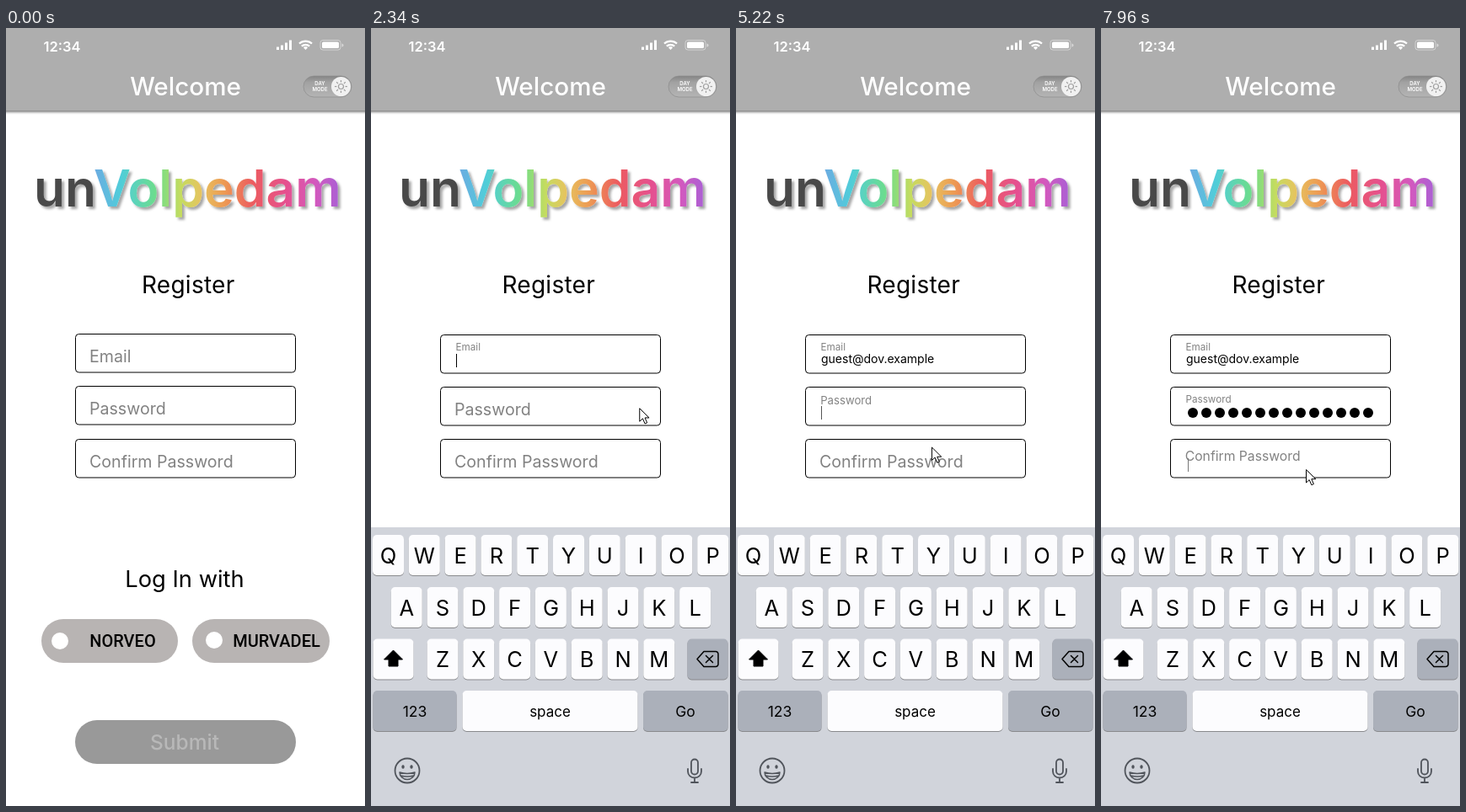
An HTML page that plays this animation: 426 px wide and 924 px high, repeating every 8000 ms.

```html
<!DOCTYPE html>
<html lang="en">
<head>
<meta charset="utf-8">
<title>Register</title>
<style>
  html, body { margin: 0; width: 100%; height: 100%; overflow: hidden; background: #fff; }
  svg { display: block; width: 100vw; height: 100vh; font-family: Inter, "Open Sans", sans-serif; }
  .mid { text-anchor: middle; }
  .provider { font: 500 20px Roboto, sans-serif; text-anchor: middle; }
</style>
</head>
<body>
<svg id="stage" viewBox="0 0 426 924">
  <defs>
    <linearGradient id="rainbow" gradientUnits="userSpaceOnUse" x1="90" y1="0" x2="397" y2="0">
      <stop offset="0" stop-color="#7a9be6"/>
      <stop offset=".15" stop-color="#50cdd9"/>
      <stop offset=".29" stop-color="#6edd8a"/>
      <stop offset=".38" stop-color="#c3dc60"/>
      <stop offset=".46" stop-color="#e6c45f"/>
      <stop offset=".55" stop-color="#ed9a53"/>
      <stop offset=".66" stop-color="#ec5c5f"/>
      <stop offset=".79" stop-color="#e5508f"/>
      <stop offset=".9" stop-color="#d459bd"/>
      <stop offset="1" stop-color="#a85fd6"/>
    </linearGradient>
    <linearGradient id="groove" x2="0" y2="1">
      <stop stop-color="#858585"/>
      <stop offset=".3" stop-color="#a2a2a2"/>
      <stop offset="1" stop-color="#b4b4b4"/>
    </linearGradient>
    <filter id="wordShadow" x="-5%" y="-10%" width="112%" height="130%">
      <feDropShadow dx="3" dy="3" stdDeviation="1.5" flood-opacity=".35"/>
    </filter>
    <filter id="barShadow" x="-5%" y="-10%" width="110%" height="130%">
      <feDropShadow dx="0" dy="2" stdDeviation="1.8" flood-opacity=".5"/>
    </filter>
    <clipPath id="typed"><rect id="typedArea" x="100" y="383" width="0" height="22"/></clipPath>
  </defs>

  <rect width="426" height="924" fill="#fff"/>

  <rect x="-10" y="-10" width="446" height="108" fill="#aeaeae" filter="url(#barShadow)"/>
  <g fill="#fff">
    <text x="44.5" y="27.5" font-size="16.5" font-weight="600">12:34</text>
    <path d="M321 22.5h3v3.500h-3zM326 20.500h3v5.500h-3zM331 17.500h3v8.500h-3zM336 14.500h3v11.500h-3z"/>
    <g fill="none" stroke="#fff" stroke-width="2.2">
      <path d="M348 18.500a11 11 0 0 1 15 0M350.800 21.600a7 7 0 0 1 9.400 0"/>
    </g>
    <path d="M355.500 26l-2.600-2.700a3.700 3.700 0 0 1 5.200 0z"/>
    <rect x="373" y="14.5" width="24" height="11.5" rx="3" fill="none" stroke="#fff" stroke-opacity=".45"/>
    <rect x="375" y="16.5" width="20" height="7.5" rx="1.5"/>
    <path d="M398.500 18.500a2 2 0 0 1 0 4z" opacity=".5"/>
    <text class="mid" x="213" y="79.5" font-size="29.6" font-weight="500">Welcome</text>
  </g>

  <rect x="353" y="57" width="57" height="25" rx="12.5" fill="url(#groove)" stroke="#8b8b8b" stroke-width=".7"/>
  <g class="mid" fill="#fff" font-size="6" font-weight="600">
    <text x="372.5" y="68">DAY</text>
    <text x="372.5" y="74.5">MODE</text>
  </g>
  <circle cx="397.5" cy="69.5" r="11.5" fill="#f1f1f1"/>
  <g id="sun" fill="none" stroke="#a0a0a0" stroke-width="1.2"><circle cx="397.5" cy="69.5" r="3"/></g>

  <text x="33" y="212" font-size="60.5" font-weight="600" filter="url(#wordShadow)"><tspan fill="#4a4a4a">un</tspan><tspan fill="url(#rainbow)">Volpedam</tspan></text>

  <text id="heading" y="315" font-size="28" letter-spacing=".25">Register</text>
  <g id="fields"></g>
  <text x="101" y="398" font-size="14" clip-path="url(#typed)">guest@dov.example</text>
  <g id="dots"></g>
  <line id="caret"/>

  <g id="submit">
    <rect x="82" y="822" width="262" height="52" rx="26" fill="#999"/>
    <text class="mid" x="212" y="857" font-size="24.5" font-weight="500" fill="#b8b8b8">Submit</text>
  </g>

  <g id="keyboard"><rect y="593" width="426" height="331" fill="#d1d4db"/></g>

  <g id="login">
    <text class="mid" x="212" y="664" font-size="27.3">Log In with</text>
    <rect x="42" y="702" width="162" height="52" rx="26" fill="#b8b4b3"/>
    <rect x="221" y="702" width="163" height="52" rx="26" fill="#b8b4b3"/>
    <circle cx="64" cy="728" r="10" fill="#fff"/>
    <circle cx="247" cy="727" r="10" fill="#fff"/>
    <text class="provider" x="138.5" y="735">NORVEO</text>
    <text class="provider" x="321" y="735">MURVADEL</text>
  </g>

  <path id="pointer" d="M.5.500V16l3.700-3.400 2.600 6.100 2.600-1.100-2.600-5.900h5z" fill="#fff" stroke="#000"/>
</svg>
<script>
const LOOP = 8000;
const $ = id => document.getElementById(id);

function add(parent, tag, attrs, text) {
  const node = document.createElementNS('http://www.w3.org/2000/svg', tag);
  set(node, attrs);
  if (text) node.textContent = text;
  return parent.appendChild(node);
}
function set(node, attrs) {
  for (const name in attrs) node.setAttribute(name, attrs[name]);
}
const mix = (a, b, p) => a + (b - a) * p;
const progress = (t, start, span) => Math.max(0, Math.min(1, (t - start) / span));
const easeOut = p => 1 - (1 - p) ** 2;

for (let i = 0; i < 8; i++) {
  add($('sun'), 'path', { d: 'M397.5 64.5v-2.5', transform: `rotate(${i * 45} 397.5 69.5)` });
}

// Keyboard
const keyboard = $('keyboard');
function key(x, y, width, fill = '#fcfcfe') {
  add(keyboard, 'rect', { x, y: y + 1, width, height: 48, rx: 5, fill: '#898a8d' });
  add(keyboard, 'rect', { x, y, width, height: 48, rx: 5, fill });
}
function keyText(x, y, size, label) {
  add(keyboard, 'text', { class: 'mid', x, y, 'font-size': size }, label);
}
[['QWERTYUIOP', 20.5, 602], ['ASDFGHJKL', 42.2, 664], ['ZXCVBNM', 85, 725.5]].forEach(([letters, x0, y]) => {
  [...letters].forEach((letter, i) => {
    const x = x0 + i * 42.8;
    key(x - 18.5, y, 37);
    keyText(x, y + 33.5, 25.5, letter);
  });
});
const DARK_KEY = '#abb0ba';
key(2.5, 725.5, 48);
key(375.5, 725.5, 48, DARK_KEY);
key(2.5, 787, 99, DARK_KEY);
key(108.5, 787, 208);
key(323, 787, 100.5, DARK_KEY);
keyText(52, 818, 17.5, '123');
keyText(212.5, 818, 17, 'space');
keyText(373, 818, 17.5, 'Go');
add(keyboard, 'path', { d: 'M26.5 739l11 11h-5.5v8h-11v-8h-5.5z', stroke: '#000', 'stroke-linejoin': 'round' });
const outline = { fill: 'none', 'stroke-linecap': 'round', 'stroke-linejoin': 'round' };
add(keyboard, 'path', { ...outline, stroke: '#000', 'stroke-width': 1.5,
  d: 'M395 740.5h14a3 3 0 0 1 3 3v12a3 3 0 0 1-3 3h-14l-8-9zM397.5 745.5l8 8m0-8l-8 8' });
const icon = { ...outline, stroke: '#50545b', 'stroke-width': 1.8 };
add(keyboard, 'circle', { ...icon, cx: 43, cy: 882, r: 14.5 });
add(keyboard, 'path', { ...icon, 'stroke-width': 1.5, d: 'M34 884q9 3 18 0a9 8.500 0 0 1-18 0zM35.500 888q7.500 2 15 0' });
for (const cx of [38, 48]) add(keyboard, 'ellipse', { cx, cy: 877.5, rx: 1.7, ry: 2.3, fill: '#50545b' });
add(keyboard, 'path', { ...icon, d: 'M380 872.5a4 4 0 0 1 8 0v10a4 4 0 0 1-8 0zM376 880v3a8 7.5 0 0 0 16 0v-3M384 890.5v5.5M380 896h8' });

// Form
const fields = [
  { label: 'Email', top: 363.5, shift: 1, focus: 1990 },
  { label: 'Password', top: 425.5, shift: 1, focus: 5050 },
  { label: 'Confirm Password', top: 488.5, shift: 0, focus: 7875 },
];
for (const field of fields) {
  field.box = add($('fields'), 'rect', { x: 82.5, width: 261, height: 45.5, rx: 4, fill: '#fff', stroke: '#000' });
  field.text = add($('fields'), 'text', { fill: '#828282' }, field.label);
}
const dots = Array.from({ length: 14 }, (_, i) =>
  add($('dots'), 'circle', { cx: 109 + 16 * i, cy: 457, r: 6 }));

// Pointer stops: time, x, y
const stops = [
  [430, 392, 450], [920, 159, 383], [1180, 159, 383], [1450, 163, 381], [1990, 163, 381],
  [2340, 318, 451], [2440, 343, 475], [2750, 261, 676], [2950, 217, 692], [3150, 217, 692],
  [3500, 217, 687], [3990, 212, 678], [4400, 240, 676], [4680, 212, 667], [4810, 212, 667],
  [5020, 240, 446], [5090, 240, 446], [5220, 232, 497], [5560, 207, 664], [5700, 212, 666],
  [6900, 212, 666], [7420, 154, 505], [7620, 154, 505], [7960, 243, 524],
];
function pointerAt(t) {
  const next = stops.findIndex(stop => stop[0] > t);
  if (next < 0) return stops[stops.length - 1].slice(1);
  const [t0, x0, y0] = stops[next - 1], [t1, x1, y1] = stops[next];
  const p = (t - t0) / (t1 - t0);
  return [mix(x0, x1, p), mix(y0, y1, p)];
}

function caretAt(t, typedWidth, dotCount) {
  if (t >= 2100 && t < 4850) return [101.5 + typedWidth, 387, t < 3250 ? '#000' : '#777'];
  if (t >= 5050 && t < 7000) return [101.5 + 16 * dotCount + (dotCount ? 1 : 0), 449, '#555'];
  if (t >= 7900) return [103.5, 511, '#777'];
  return null;
}

function draw(t) {
  const slide = progress(t, 1560, 350);
  const open = easeOut(slide);
  set($('keyboard'), { opacity: open });
  set($('login'), { opacity: 1 - open });
  set($('submit'), { opacity: 1 - open });
  set($('heading'), { x: mix(161, 155.5, slide) });

  for (const { box, text, top, shift, focus } of fields) {
    const y = top + Math.round(shift * slide);
    const p = easeOut(progress(t, focus, 300));
    set(box, { y });
    set(text, { x: mix(99, 100.5, p), y: y + mix(33.5, 18, p), 'font-size': mix(19.6, 11.7, p) });
  }

  const typedWidth = 137 * progress(t, 3250, 830);
  set($('typedArea'), { width: typedWidth + 1 });
  const dotCount = t < 5960 ? 0 : Math.min(14, 1 + Math.floor((t - 5960) / 69.5));
  dots.forEach((dot, i) => set(dot, { visibility: i < dotCount ? 'visible' : 'hidden' }));

  const caret = caretAt(t, typedWidth, dotCount);
  set($('caret'), { visibility: caret ? 'visible' : 'hidden' });
  if (caret) {
    const [x, y, stroke] = caret;
    set($('caret'), { x1: x, x2: x, y1: y, y2: y + 16, stroke });
  }

  const shown = t >= stops[0][0];
  set($('pointer'), { visibility: shown ? 'visible' : 'hidden' });
  if (shown) set($('pointer'), { transform: `translate(${pointerAt(t)})` });
}

const start = performance.now();
function tick() {
  draw((performance.now() - start) % LOOP);
  requestAnimationFrame(tick);
}
tick();
</script>
</body>
</html>
```
